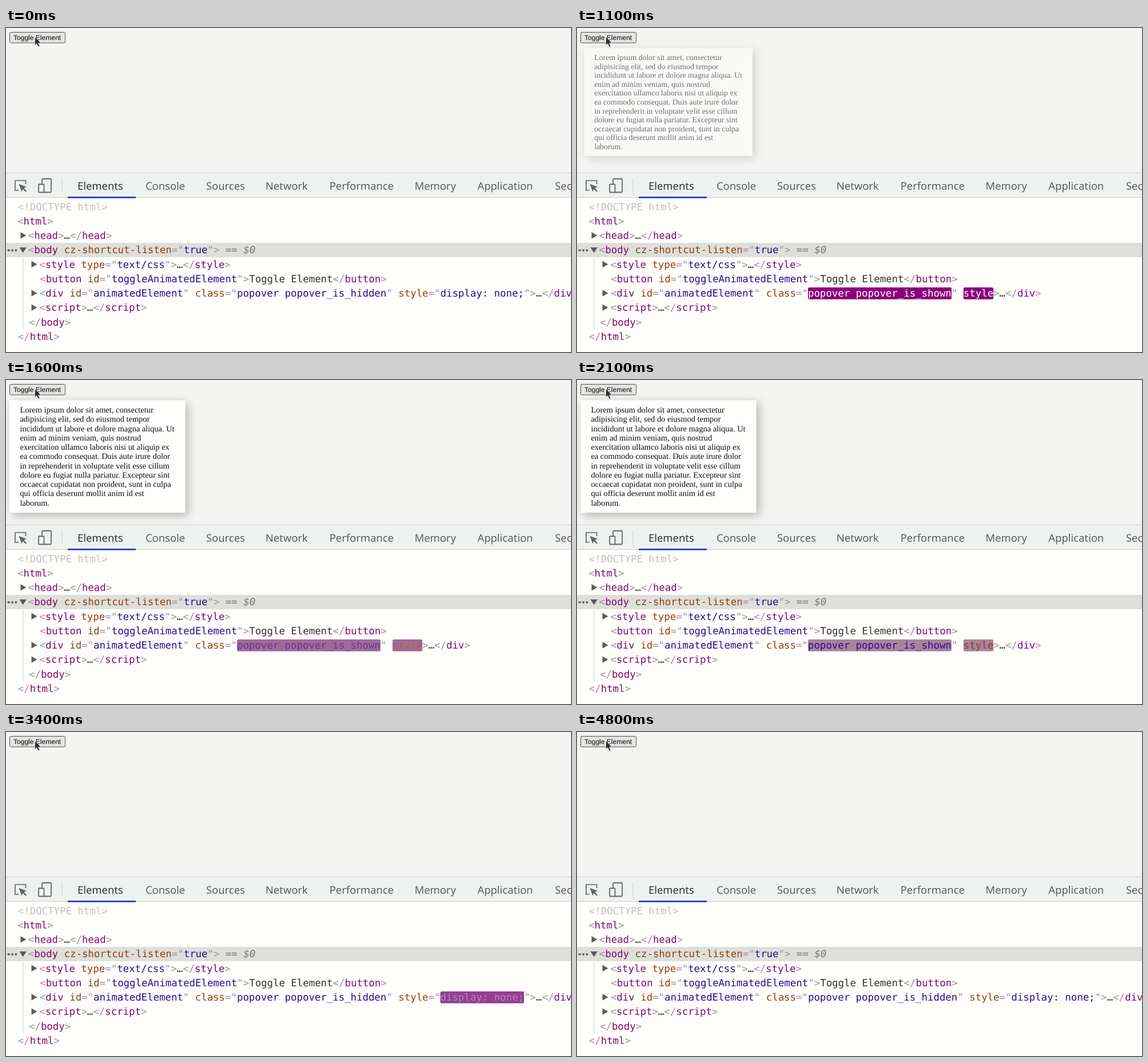
Recreate the animation shown at these times as an HTML page with a canvas. Size 988 by 567 pixels, loop 5 s.

```html
<!DOCTYPE html>
<html lang="en">
<head>
<meta charset="utf-8">
<title>Toggle Element</title>
<style>
  html, body { margin: 0; width: 100%; height: 100%; overflow: hidden; background: #fefefb; }
  canvas { display: block; }
</style>
</head>
<body>
<canvas id="stage" width="988" height="567"></canvas>
<script>
const W = 988, H = 567, LOOP = 5000, STEP = 100;
const ctx = document.getElementById('stage').getContext('2d');
ctx.textRendering = 'geometricPrecision';

const MONO = '"DejaVu Sans Mono", monospace';
const CODE_SIZE = 17.37, CELL = CODE_SIZE * 0.602;
const INK = {
  punct: [164, 140, 162], tag: [127, 8, 104], attr: [144, 62, 18],
  value: [44, 10, 143], text: [48, 48, 48]
};
const HOT = [139, 0, 123], WARM = [168, 132, 158], WHITE = [255, 255, 255];
const FLASH = 1400, KNEE = 0.8 * FLASH;
const LOREM = [
  'Lorem ipsum dolor sit amet, consectetur',
  'adipisicing elit, sed do eiusmod tempor',
  'incididunt ut labore et dolore magna aliqua. Ut',
  'enim ad minim veniam, quis nostrud',
  'exercitation ullamco laboris nisi ut aliquip ex',
  'ea commodo consequat. Duis aute irure dolor',
  'in reprehenderit in voluptate velit esse cillum',
  'dolore eu fugiat nulla pariatur. Excepteur sint',
  'occaecat cupidatat non proident, sunt in culpa',
  'qui officia deserunt mollit anim id est',
  'laborum.'
];
const TABS = [
  ['Elements', 125], ['Console', 244], ['Sources', 350], ['Network', 453.7],
  ['Performance', 565.7], ['Memory', 714.5], ['Application', 824.5], ['Security', 960]
];

const clamp = v => Math.max(0, Math.min(1, v));
const mix = (a, b, p) => a.map((v, i) => v + (b[i] - v) * p);
const rgb = (c, alpha = 1) => `rgba(${c.map(Math.round).join(',')},${alpha})`;

// Solves cubic-bezier(x1, y1, x2, y2) by bisection.
function bezier(x1, y1, x2, y2) {
  const at = (a, b, s) => 3 * (1 - s) ** 2 * s * a + 3 * (1 - s) * s * s * b + s ** 3;
  return x => {
    let lo = 0, hi = 1;
    for (let i = 0; i < 24; i++) {
      const mid = (lo + hi) / 2;
      if (at(x1, x2, mid) < x) lo = mid; else hi = mid;
    }
    return at(y1, y2, lo);
  };
}
const easeOut = bezier(0, 0, 0.2, 1);
const ease = bezier(0.25, 0.1, 0.25, 1);

function rect(x, y, w, h, color) {
  ctx.fillStyle = color;
  ctx.fillRect(x, y, w, h);
}

function poly(color, points) {
  ctx.beginPath();
  points.forEach(([x, y]) => ctx.lineTo(x, y));
  ctx.closePath();
  ctx.fillStyle = color;
  ctx.fill();
}

function box(x, y, w, h, r) {
  ctx.beginPath();
  ctx.roundRect(x, y, w, h, r);
}

function text(str, x, y, font, color) {
  ctx.font = font;
  ctx.fillStyle = color;
  ctx.fillText(str, x, y);
}

const baseline = row => 470 + (row - 6) * 25.25;

function code(str, x, row, color, style = '') {
  text(str, x, baseline(row), `${style} ${CODE_SIZE}px ${MONO}`, color);
}

function flashText(str, x, row, ink, age) {
  const p = easeOut(clamp(age / KNEE));
  const fade = easeOut(clamp((age - KNEE) / (FLASH - KNEE)));
  ctx.fillStyle = rgb(mix(HOT, WARM, p), 1 - fade);
  box(x, baseline(row) - 15.9, str.length * CELL, 20.6, 2.5);
  ctx.fill();
  code(str, x, row, rgb(mix(WHITE, ink, p)));
}

// Colours one line of markup; words listed in flash.words get the update highlight.
function markup(src, x, row, flash) {
  let mode = 'text';
  const put = (str, kind) => {
    const word = str.trim(), pad = str.indexOf(word) * CELL;
    if (flash && flash.words.includes(word)) flashText(word, x + pad, row, INK[kind], flash.age);
    else code(str, x, row, rgb(INK[kind]));
    x += str.length * CELL;
  };
  for (const tok of src.match(/<\/?|="|[">]|[^<>"=]+/g)) {
    if (/^[<>="]/.test(tok)) {
      put(tok, 'punct');
      mode = tok[0] === '<' ? 'tag' : tok === '="' ? 'value' : tok === '"' ? 'attr' : 'text';
    } else if (mode === 'tag') {
      const [, name, rest] = tok.match(/^(\S+)(.*)$/);
      put(name, 'tag');
      if (rest) put(rest, 'attr');
    } else put(tok, mode);
  }
}

function arrow(x, row) {
  const y = baseline(row) - 6;
  poly('#5b5b5d', [[x, y - 5.7], [x + 10, y], [x, y + 5.7]]);
}

function button(pressed) {
  box(6.5, 7.5, 97, 18.5, 2.5);
  ctx.fillStyle = pressed ? '#f2f2f1' : '#e4e5e3';
  ctx.fill();
  ctx.lineWidth = 1;
  ctx.strokeStyle = pressed ? '#858585' : '#505050';
  ctx.stroke();
  text('Toggle Element', 13, 21, '12.04px "Liberation Sans", Arial, sans-serif', '#0c0c0c');
}

function pointer() {
  const shape = [[50.5, 15.5], [50.5, 30.3], [53.8, 27.3], [56.2, 32.8], [58.8, 31.7], [56.4, 26.4], [60.8, 26]];
  poly('#2b2b2b', shape);
  ctx.lineWidth = 0.8;
  ctx.strokeStyle = 'rgba(255,255,255,0.75)';
  ctx.stroke();
}

function popover(shown) {
  if (shown <= 0) return;
  const x = 6.2, y = 35.5, w = 307, h = 196.6, scale = 0.9 + 0.1 * shown;
  ctx.save();
  ctx.globalAlpha = shown;
  ctx.translate(x + w / 2, y);
  ctx.scale(scale, scale);
  ctx.translate(-x - w / 2, -y);

  // The shadow falls outside the panel only.
  ctx.save();
  ctx.beginPath();
  ctx.rect(-60, -60, 500, 400);
  ctx.rect(x, y, w, h);
  ctx.clip('evenodd');
  ctx.shadowColor = 'rgba(0,0,0,0.26)';
  ctx.shadowBlur = 16;
  ctx.shadowOffsetX = ctx.shadowOffsetY = 4.5;
  rect(x, y, w, h, '#fff');
  ctx.restore();

  rect(x, y, w, h, '#fefefc');
  LOREM.forEach((line, i) =>
    text(line, x + 18.2, 57 + i * 16.26, '14.45px "Liberation Serif", "Times New Roman", serif', '#120a10'));
  ctx.restore();
}

function toolbar() {
  rect(0, 253, W, 44, '#eff1f0');
  rect(0, 253, W, 1, '#cdcfce');
  rect(0, 296, W, 1, '#cbcdcc');
  rect(97.5, 263, 1, 25, '#cccecd');

  ctx.strokeStyle = '#636567';
  ctx.lineWidth = 1.7;
  ctx.beginPath();
  [[22, 284], [16, 284], [16, 267], [34.5, 267], [34.5, 273]].forEach(([x, y]) => ctx.lineTo(x, y));
  ctx.stroke();
  poly('#636567', [[22.5, 273], [36, 278], [31.3, 280.2], [36, 285], [34.2, 286.8], [29.5, 282], [27.3, 286.5]]);

  ctx.lineWidth = 1.8;
  box(63, 264, 16, 23.5, 1.5);
  ctx.stroke();
  box(57, 273.5, 9.5, 14, 1);
  ctx.fillStyle = '#eff1f0';
  ctx.fill();
  ctx.stroke();

  TABS.forEach(([label, x], i) =>
    text(label, x, 282.5, '18.4px "Noto Sans", sans-serif', i ? '#5a5d5f' : '#303234'));
  rect(108, 295, 119, 3, '#3347c6');
}

// What the inspected element looks like in the tree at time t.
function elementState(t) {
  const hidden = 'popover popover_is_hidden', shown = 'popover popover_is_shown', none = 'display: none;';
  if (t < 1100) return { cls: hidden, style: `="${none}"` };
  if (t < 2800) return { cls: shown, style: '', flash: { words: [shown, 'style'], age: t - 1100 } };
  if (t < 3200) return { cls: hidden, style: '', flash: { words: [hidden], age: t - 2780 } };
  return { cls: hidden, style: `="${none}"`, flash: { words: [none], age: t - 3200 } };
}

function tree(t) {
  rect(0, 297, W, H - 297, '#fefefb');
  rect(0, 376, W, 25, '#dedfdb');
  rect(29.5, 402, 1, 125, '#d3cfdd');
  rect(108, 295, 119, 3, '#3347c6');

  code('<!DOCTYPE html>', 20.8, 0, '#c0c0bf');
  markup('<html>', 20, 1);
  markup('<head>…</head>', 38.8, 2);
  markup('<body cz-shortcut-listen="true">', 38.8, 3);
  code('==', 38.8 + 33 * CELL, 3, '#777877');
  code('$0', 38.8 + 36 * CELL, 3, '#777877', 'italic');
  markup('<style type="text/css">…</style>', 58.2, 4);
  markup('<button id="toggleAnimatedElement">Toggle Element</button>', 59.2, 5);
  const { cls, style, flash } = elementState(t);
  markup(`<div id="animatedElement" class="${cls}" style${style}>…</div>`, 58.9, 6,
    flash && flash.age < FLASH ? flash : null);
  markup('<script>…<\/script>', 58.2, 7);
  markup('</body>', 40, 8);
  markup('</html>', 20.8, 9);

  arrow(25.5, 2);
  [4, 6, 7].forEach(row => arrow(44.5, row));
  poly('#5b5b5d', [[23.5, 384], [36, 384], [29.7, 393.5]]);
  ctx.fillStyle = '#636363';
  [4.7, 11, 17.3].forEach(x => {
    ctx.beginPath();
    ctx.arc(x, 389, 2.1, 0, 7);
    ctx.fill();
  });
}

function draw(time) {
  const t = Math.floor((time % LOOP) / STEP) * STEP;
  const fade = start => ease(clamp((t - start) / 300));
  rect(0, 0, W, 253, '#f4f4f2');
  popover(fade(1000) - fade(2705));
  button(t >= 900 && t < 1000);
  pointer();
  toolbar();
  tree(t);
}

const start = performance.now();
function tick() {
  draw(performance.now() - start);
  requestAnimationFrame(tick);
}
tick();
</script>
</body>
</html>
```
